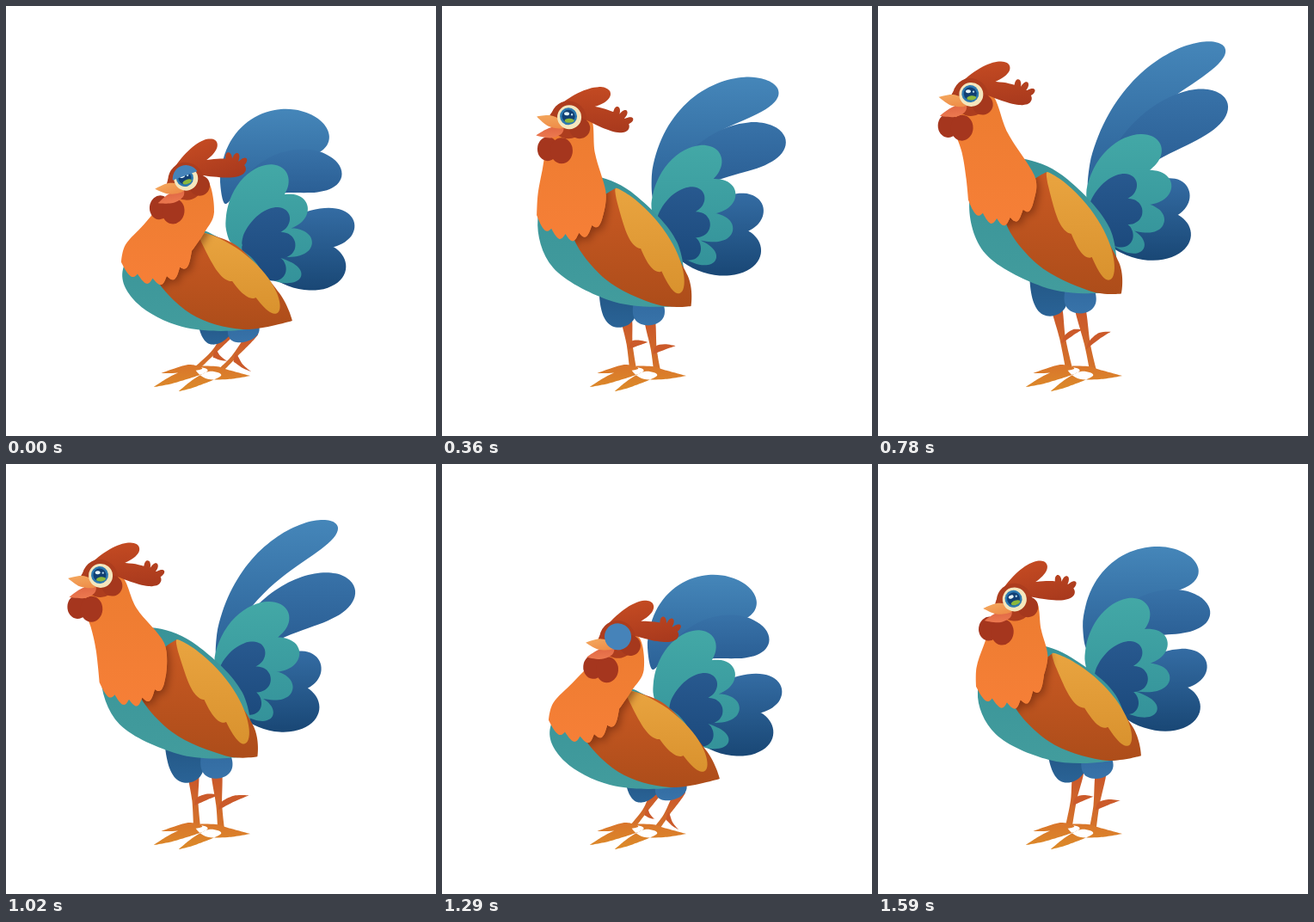
An HTML page with a canvas for the animation above (1.62 s loop, 500 px wide and 500 px high).

```html
<!DOCTYPE html>
<html lang="en">
<head>
<meta charset="utf-8">
<title>Rooster</title>
<style>
html, body { margin: 0; width: 100%; height: 100%; overflow: hidden; background: #fff; }
canvas { display: block; width: 100vmin; height: 100vmin; }
</style>
</head>
<body>
<canvas id="stage" width="500" height="500"></canvas>
<script>
const ctx = document.getElementById('stage').getContext('2d');
const LOOP = 1620, STEP = 30, RAD = Math.PI / 180;

const pt = (x, y, sharp = false) => ({ x, y, sharp });
const mix = (a, b, u) => a + (b - a) * u;
const part = (t, from, to) => Math.max(0, Math.min(1, (t - from) / (to - from)));
const ease = (t, from, to) => { const p = part(t, from, to); return p * p * (3 - 2 * p); };
const bump = (t, from, to) => Math.sin(Math.PI * part(t, from, to)) ** 2;
const grow = (t, from, to) => Math.sin(Math.PI / 2 * part(t, from, to));

// Everything that moves follows from a few eased drives
function poseAt(t) {
  const rise = t < 1300 ? grow(t, 30, 540) * (1 - ease(t, 1000, 1290)) : grow(t, 1310, 2030);
  const lift = bump(t, 540, 1020), reach = bump(t, 540, 1260), settle = bump(t, 780, 1260);
  const squat = bump(t, 1110, 1470), rebound = ease(t, 1290, 1590);
  const headRise = rise ** 1.6;
  return {
    rise, lift, settle,
    open: rise ** 3,
    tilt: (-lift - 4 * settle - 4 * rebound) * RAD,
    body: pt(6 * settle - 10 * squat - 2 * rebound, -10 * lift - 8 * rebound),
    tail: pt(-10 * squat - 6 * rebound, -11 * lift + 9 * squat - 12 * rebound),
    sag: 18 * settle,
    eye: pt(mix(208, 129, headRise) - 29 * reach - 18 * ease(t, 1140, 1590),
      mix(200, 107, headRise) - 5 * lift + 20 * settle - 5 * rebound),
    headTurn: (-20 * (1 - rise) ** 2 - 8 * reach + 8 * squat - 14 * rebound) * RAD,
    beak: Math.min(1, .35 + rise) * (1 - ease(t, 1290, 1500)),
    lid: Math.max(0, 1 - Math.abs(t - 1290) / 110, .4 - t / 150)
  };
}

function curve(pts) {
  const path = new Path2D(), n = pts.length;
  path.moveTo(pts[0].x, pts[0].y);
  pts.forEach((b, i) => {
    const a = pts[(i + n - 1) % n], c = pts[(i + 1) % n], d = pts[(i + 2) % n];
    const k = b.sharp ? 0 : 1 / 6, m = c.sharp ? 0 : 1 / 6;
    path.bezierCurveTo(b.x + (c.x - a.x) * k, b.y + (c.y - a.y) * k,
      c.x - (d.x - b.x) * m, c.y - (d.y - b.y) * m, c.x, c.y);
  });
  return path;
}

// Fills one or more outlines as a single shape with a vertical gradient
function paint(outlines, top, bottom = top) {
  const ys = outlines.flat().map(p => p.y), path = new Path2D();
  const shade = ctx.createLinearGradient(0, Math.min(...ys), 0, Math.max(...ys));
  shade.addColorStop(0, top);
  shade.addColorStop(1, bottom);
  outlines.forEach(pts => path.addPath(curve(pts)));
  ctx.fillStyle = shade;
  ctx.fill(path);
  return path;
}

// Rounded feather along a bent spine; a positive bend bows to the left of its direction
function feather(base, tip, width, bend) {
  const dx = tip.x - base.x, dy = tip.y - base.y, n = 14, left = [], right = [];
  const cx = base.x + dx / 2 + dy * bend, cy = base.y + dy / 2 - dx * bend;
  for (let i = 0; i <= n; i++) {
    const s = Math.sin(Math.PI / 2 * i / n), r = 1 - s;
    const x = r * r * base.x + 2 * r * s * cx + s * s * tip.x;
    const y = r * r * base.y + 2 * r * s * cy + s * s * tip.y;
    const tx = r * (cx - base.x) + s * (tip.x - cx), ty = r * (cy - base.y) + s * (tip.y - cy);
    const w = 1.2 * width * s ** .6 * Math.sqrt(1 - s ** 4) / Math.hypot(tx, ty);
    left.push(pt(x + ty * w, y - tx * w));
    if (i > 0 && i < n) right.unshift(pt(x - ty * w, y + tx * w));
  }
  return left.concat(right);
}

const ray = (p, degrees, length) =>
  pt(p.x + Math.cos(degrees * RAD) * length, p.y + Math.sin(degrees * RAD) * length);

function fan(root, { count, start, step, length, taper = 0, width, thin = 0, bend = 0, unbend = 0 }) {
  return Array.from({ length: count }, (_, i) => feather(root,
    ray(root, start + step * i, length * (1 - taper * i)), width * (1 - thin * i), bend - unbend * i));
}

function drawTail({ rise, open, lift, settle, tail }) {
  const root = (x, y, X, Y) => pt(mix(x, X, rise) + tail.x, mix(y, Y, rise) + tail.y);
  const m = (a, b) => mix(a, b, open);

  const plume = root(255, 230, 245, 225);
  const plumeTip = ray(plume, m(-31, -47) + lift - settle, m(140, 224) * (1 + .02 * lift - .06 * settle));
  paint([feather(plume, plumeTip, m(36, 27) - 3 * settle, m(.58, .26))], '#4586b9', '#2b6197');

  const sickle = root(262, 235, 255, 235);
  const sickleTip = ray(sickle, m(-15, -36) + 5 * settle, m(132, 182) * (1 + .03 * lift - .03 * settle));
  paint([feather(sickle, sickleTip, m(30, 35), m(.36, .22))], '#3872a8', '#26588e');

  paint(fan(root(285, 285, 262, 277), { count: 2, start: m(-14, -27) + 4 * settle, step: 19,
    length: m(124, 112), taper: .12, width: 28, thin: -.15, bend: .1, unbend: .35 }), '#346ca3', '#194775');
  paint(fan(root(262, 275, 245, 245), { count: 4, start: m(-50, -39), step: 25, length: m(102, 109),
    taper: m(.04, .09), width: 28, thin: .14, bend: .3, unbend: .15 }), '#43a8a6', '#34929a');
  paint(fan(root(275, 278, 246, 250), { count: 3, start: -31, step: 31, length: 64,
    taper: .04, width: 18, bend: .2, unbend: .2 }), '#28598f', '#1c4a7d');
}

// Maps a crouched and a stretched position to the current one
function placer({ rise, tilt, body }) {
  const c = Math.cos(tilt), s = Math.sin(tilt);
  return (x, y, X, Y, sharp) => {
    const dx = mix(x, X, rise) - 200, dy = mix(y, Y, rise) - 290;
    return pt(200 + body.x + dx * c - dy * s, 290 + body.y + dx * s + dy * c, sharp);
  };
}

function leg(hip, ankle, spurAt, tip) {
  const x = mix(hip.x, ankle.x, spurAt), y = mix(hip.y, ankle.y, spurAt);
  paint([[pt(hip.x - 6, hip.y - 4), pt(x - 3.5, y), pt(ankle.x - 4, ankle.y, true),
    pt(ankle.x + 4, ankle.y, true), pt(x + 3.5, y), pt(hip.x + 6, hip.y - 4)]], '#c8542a', '#d5742b');
  paint([[pt(x - 1, y + 6, true), pt(x + 2, y - 3), pt(mix(x, tip.x, .5), mix(y, tip.y, .7) - 3),
    pt(tip.x, tip.y, true), pt(mix(x, tip.x, .5), mix(y, tip.y, .6) + 3)]], '#cb5a2a');
}

function drawLegs(place) {
  leg(place(261, 384, 206, 362), pt(222, 421), .5, place(257, 413, 236, 387));
  leg(place(287, 386, 233, 362), pt(250, 423), .58, place(285, 425, 269, 390));
  const toe = (x, y, fromX, fromY) => [pt(x, y, true), pt(mix(x, fromX, .4), mix(y, fromY, .6) - 2),
    pt(fromX - 6, fromY - 4), pt(fromX + 8, fromY + 1), pt(mix(x, fromX, .5), mix(y, fromY, .4) + 2)];
  paint([toe(180, 427, 220, 421), toe(172, 443, 226, 424), toe(201, 448, 242, 429),
    [pt(284, 430, true), pt(258, 423), pt(244, 419), pt(220, 420), pt(232, 433), pt(258, 434)]], '#d9752b', '#dc8b29');
  paint([feather(place(225, 350, 180, 305), place(255, 388, 207, 369), 23, 0)], '#20527f', '#2a6396');
  paint([feather(place(268, 350, 232, 312), place(280, 390, 235, 368), 22, 0)], '#2d649a', '#3873a9');
}

function neckOutline({ eye, sag }, place) {
  const hemPoint = (...spot) => { const p = place(...spot); p.y += sag * .7; return p; };
  const start = hemPoint(134, 298, 106, 234), end = hemPoint(216, 285, 184, 229);
  const dx = end.x - start.x, dy = end.y - start.y, span = Math.hypot(dx, dy);
  const lobes = 5, perLobe = 4, hem = [];
  for (let i = 0; i <= lobes * perLobe; i++) {
    const s = i / (lobes * perLobe), notch = i % perLobe === 0;
    const depth = 25 * Math.sin(Math.PI * s) ** .8 + 8 * Math.abs(Math.sin(lobes * Math.PI * s));
    hem.push(pt(start.x + dx * s - dy / span * depth, start.y + dy * s + dx / span * depth, notch));
  }
  const follow = (p, pull, ox, oy) => pt(mix(p.x, eye.x + ox, pull), mix(p.y, eye.y + oy, pull));
  return [...hem,
    place(231, 263, 183, 206),
    follow(place(242, 234, 163, 158), .5, 34, 45),
    pt(eye.x + 26, eye.y + 2), pt(eye.x, eye.y), pt(eye.x - 22, eye.y + 24),
    follow(place(148, 246, 107, 178), .35, -24, 68),
    follow(place(134, 275, 106, 208), .1, -24, 100)];
}

function drawBody(pose, place) {
  paint([[place(175, 255, 130, 190), place(136, 306, 107, 238), place(153, 346, 125, 297),
    place(205, 373, 190, 336), place(270, 377, 250, 345), place(310, 362, 275, 335),
    place(292, 300, 270, 270), place(245, 268, 222, 212), place(210, 255, 175, 188)]], '#399398', '#429c9d');
  const wing = paint([[place(173, 312, 148, 255), place(215, 358, 185, 310), place(275, 376, 245, 342),
    place(333, 366, 282, 346, true), place(318, 334, 280, 310), place(270, 280, 243, 248),
    place(225, 263, 198, 203, true), place(200, 285, 178, 216)]], '#c95923', '#ad4d1a');

  const shoulder = place(224, 263, 198, 203), turn = pose.tilt / RAD;
  paint(fan(shoulder, { count: 3, start: mix(46, 61, pose.rise) + turn, step: 3,
    length: mix(131, 145, pose.rise), taper: .23, width: 15, bend: .16, unbend: .05 }), '#e9a440', '#d9922e');

  const neck = neckOutline(pose, place);
  ctx.save();
  ctx.clip(wing);
  ctx.shadowColor = 'rgba(100,35,10,.6)';
  ctx.shadowBlur = 10;
  ctx.shadowOffsetX = 3;
  ctx.shadowOffsetY = 4;
  paint([neck], '#e77630');
  ctx.restore();
  paint([neck], '#ec7c30', '#f67f37');
}

function ellipse(x, y, rx, ry, color) {
  ctx.fillStyle = color;
  ctx.beginPath();
  ctx.ellipse(x, y, rx, ry, 0, 0, Math.PI * 2);
  ctx.fill();
}
const disc = (x, y, r, color) => ellipse(x, y, r, r, color);

function drawEye(lid) {
  disc(1, 1, 14, '#f4e6bd');
  disc(0, 0, 10, '#2c79b0');
  disc(0, 0, 7.5, '#123f73');
  ellipse(1, 5, 5.5, 2.6, '#8bb83d');
  ellipse(-2, -3, 3, 2, '#e6f5f7');
  disc(4, -2, 1.2, '#b9dcec');
  ctx.save();
  ctx.beginPath();
  ctx.rect(-16, -16, 34, 34 * lid);
  ctx.clip();
  disc(1, 1, 15.5, '#4683b9');
  ctx.restore();
}

function drawHead({ eye, headTurn, beak, lid }) {
  ctx.save();
  ctx.translate(eye.x, eye.y);
  ctx.save();
  ctx.rotate(-headTurn * .4);
  ellipse(-24, 38, 12, 14, '#a5361e');
  ellipse(-8, 40, 13, 15, '#a5361e');
  ctx.restore();

  ctx.rotate(headTurn);
  const palm = pt(50, 11);
  paint([feather(pt(-22, 0), pt(49, -27), 13, .08), feather(pt(-5, -12), pt(70, 15), 13, .05),
    ...fan(palm, { count: 3, start: -72, step: 27, length: 23, taper: -.07, width: 4.5, bend: -.1 })], '#c34a22', '#a8391d');
  ellipse(0, 4, 21, 22, '#ad3d1e');
  ellipse(13, 14, 12, 12, '#a5381d');

  ctx.save();
  ctx.translate(-7, 11);
  ctx.rotate((1 - beak) * .25);
  paint([[pt(-31, 11, true), pt(-17, 3), pt(0, 0), pt(-1, 9), pt(-14, 14)]], '#df6643', '#ec7950');
  ctx.restore();
  paint([[pt(-37, 0, true), pt(-20, -1), pt(-5, 7), pt(-8, 14), pt(-24, 11)]], '#f3a45b', '#ee8d48');
  drawEye(lid);
  ctx.restore();
}

function draw() {
  const pose = poseAt(Math.floor(performance.now() / STEP) * STEP % LOOP);
  const place = placer(pose);
  ctx.fillStyle = '#fff';
  ctx.fillRect(0, 0, 500, 500);
  drawTail(pose);
  drawLegs(place);
  drawBody(pose, place);
  drawHead(pose);
  requestAnimationFrame(draw);
}
draw();
</script>
</body>
</html>
```
